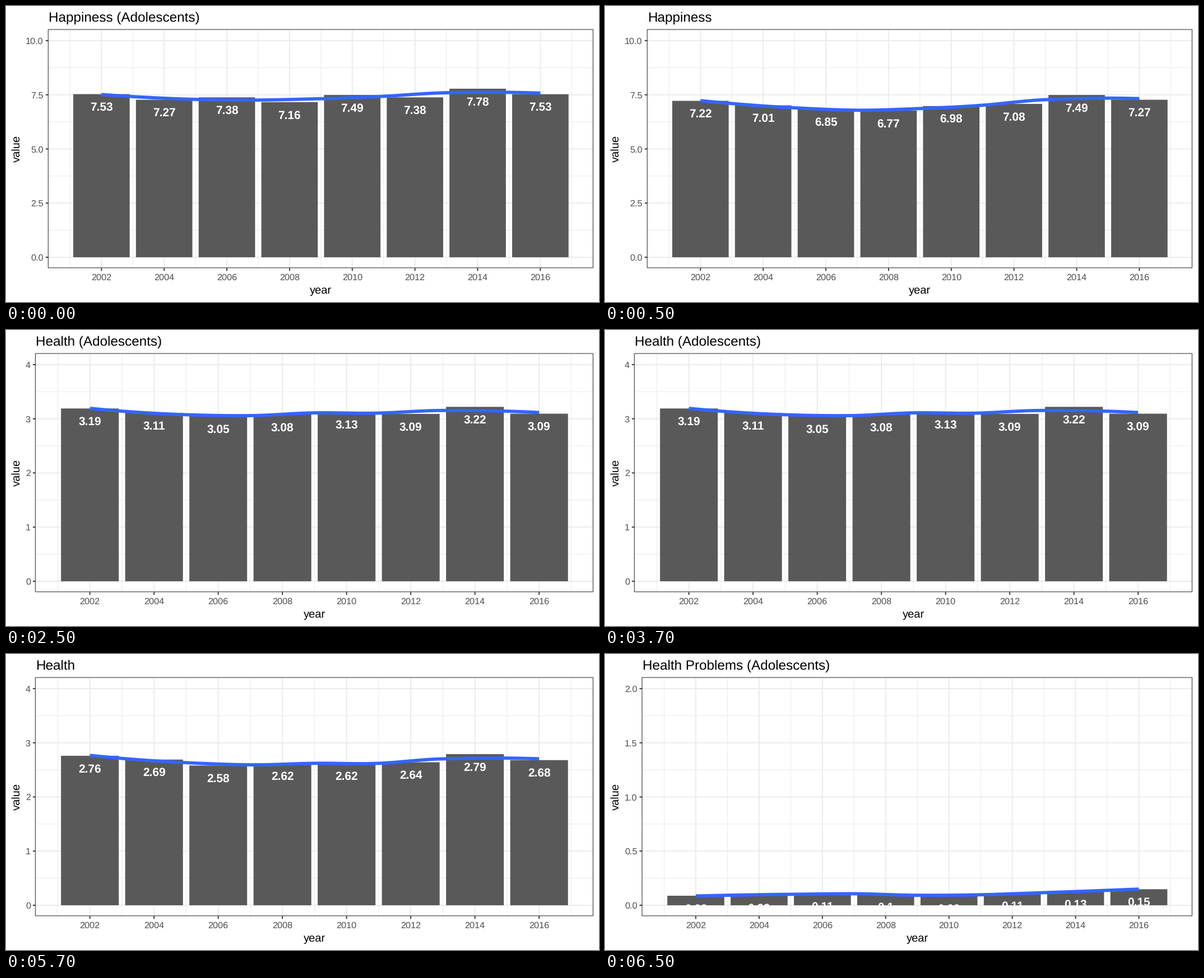
A matplotlib script for the animation above (8000 ms loop, 1058x529 px).

```python
import numpy as np
import matplotlib.pyplot as plt
from matplotlib.animation import FuncAnimation
from matplotlib.patches import Rectangle

W, H, DPI = 1058, 529, 92
PX = 72 / DPI  # points per pixel
TOP, BOTTOM, RIGHT = 42.5, 468.4, 1047.9
YEARS = np.arange(2002, 2017, 2)
X_MIN, X_MAX = 2000.31, 2017.69

plt.rcParams["font.family"] = ["Liberation Sans", "DejaVu Sans"]
plt.rcParams["text.hinting"] = "none"

# title, panel left, y maximum, y step, tick format, values, frames shown
CHARTS = [
    ("Happiness (Adolescents)", 75.8, 10, 2.5, ".1f",
     [7.53, 7.27, 7.38, 7.16, 7.49, 7.38, 7.78, 7.527], 1),
    ("Happiness", 75.8, 10, 2.5, ".1f",
     [7.22, 7.01, 6.85, 6.77, 6.98, 7.08, 7.49, 7.27], 4),
    ("Health (Adolescents)", 52.9, 4, 1, ".0f",
     [3.19, 3.11, 3.05, 3.08, 3.13, 3.09, 3.22, 3.094], 4),
    ("Health", 52.9, 4, 1, ".0f",
     [2.76, 2.69, 2.58, 2.62, 2.62, 2.64, 2.79, 2.68], 4),
    ("Health Problems (Adolescents)", 66.6, 2, 0.5, ".1f",
     [0.088, 0.09, 0.109, 0.1, 0.088, 0.11, 0.13, 0.148], 3),
]
SCHEDULE = [chart for chart in CHARTS for _ in range(chart[-1])]


def local_fit(x, values, near=6):
    """Value and slope at x of a tricube-weighted local quadratic."""
    t = YEARS - x
    dist = np.abs(t)
    reach = np.sort(dist)[near - 1]
    weight = np.clip(1 - (dist / reach) ** 3, 0, None) ** 1.5
    basis = np.stack([np.ones_like(t), t, t * t], axis=1)
    coef = np.linalg.lstsq(basis * weight[:, None], values * weight, rcond=None)[0]
    return coef[:2]


def loess(x, values):
    """Cubic Hermite blend of local fits at the cell borders."""
    knots = np.r_[2000.6, np.arange(2003, 2016, 2), 2017.4]
    level, slope = np.array([local_fit(k, values) for k in knots]).T
    i = np.clip(np.searchsorted(knots, x, side="right") - 1, 0, len(knots) - 2)
    h = knots[i + 1] - knots[i]
    u = (x - knots[i]) / h
    return ((1 + 2 * u) * (1 - u) ** 2 * level[i] + u * (1 - u) ** 2 * h * slope[i]
            + u * u * (3 - 2 * u) * level[i + 1] - u * u * (1 - u) * h * slope[i + 1])


fig = plt.figure(figsize=(W / DPI, H / DPI), dpi=DPI, facecolor="white")
ax = fig.add_axes([0, 0, 1, 1])


def line(xs, ys, width, color, **kw):
    ax.plot(xs, ys, color=color, lw=width * PX, solid_capstyle="butt",
            snap=False, **kw)


def box(x, y, w, h, **kw):
    ax.add_patch(Rectangle((x, y), w, h, snap=False, **kw))


def label(x, y, text, size, color="black", **kw):
    ax.text(x, y, text, fontsize=size * PX, color=color,
            **{"ha": "center", "va": "baseline", **kw})


def draw(frame):
    title, left, y_max, step, fmt, values, _ = SCHEDULE[frame]
    values = np.array(values)

    def sx(year):
        return left + (year - X_MIN) / (X_MAX - X_MIN) * (RIGHT - left)

    def sy(v):
        return BOTTOM - (v / y_max + 0.05) / 1.1 * (BOTTOM - TOP)

    ax.clear()
    ax.set(xlim=(0, W), ylim=(H, 0))
    ax.axis("off")

    ticks = np.arange(0, y_max + step / 2, step)
    grid = [(ticks[:-1] + step / 2, np.arange(2001, 2018, 2), 1),
            (ticks, YEARS, 1.9)]
    for rows, cols, width in grid:
        for v in rows:
            line([left, RIGHT], [sy(v)] * 2, width, "#EBEBEB")
        for year in cols:
            line([sx(year)] * 2, [TOP, BOTTOM], width, "#EBEBEB")

    for year, v in zip(YEARS, values):
        x0, x1 = sx(year - 0.9), sx(year + 0.9)
        box(x0, sy(v), x1 - x0, sy(0) - sy(v), fc="#595959", lw=0, zorder=3)
        label(sx(year), sy(v) + 29.5, f"{round(v, 2):g}", 20.9, "white",
              weight="bold", zorder=5)

    xs = np.linspace(2002, 2016, 80)
    line(sx(xs), sy(loess(xs, values)), 5.87, "#3366FF", zorder=4)

    box(left - 0.5, TOP - 0.5, RIGHT - left, BOTTOM - TOP, fill=False,
        ec="#333333", lw=1.1 * PX, zorder=6)
    for v in ticks:
        line([left - 5, left], [sy(v)] * 2, 1.9, "#333333")
        label(left - 9, sy(v) + 6, f"{v:{fmt}}", 16.2, "#4D4D4D", ha="right")
    for year in YEARS:
        line([sx(year)] * 2, [BOTTOM, BOTTOM + 5], 1.9, "#333333")
        label(sx(year), 490, str(year), 16.2, "#4D4D4D")

    label(left, 28, title, 24.3, ha="left")
    label((left + RIGHT) / 2, 514, "year", 20.2)
    label(25, (TOP + BOTTOM) / 2, "value", 20.2, rotation=90,
          rotation_mode="anchor")


anim = FuncAnimation(fig, draw, frames=len(SCHEDULE), init_func=lambda: None,
                     interval=500, repeat=True, repeat_delay=0)
plt.show()
```
